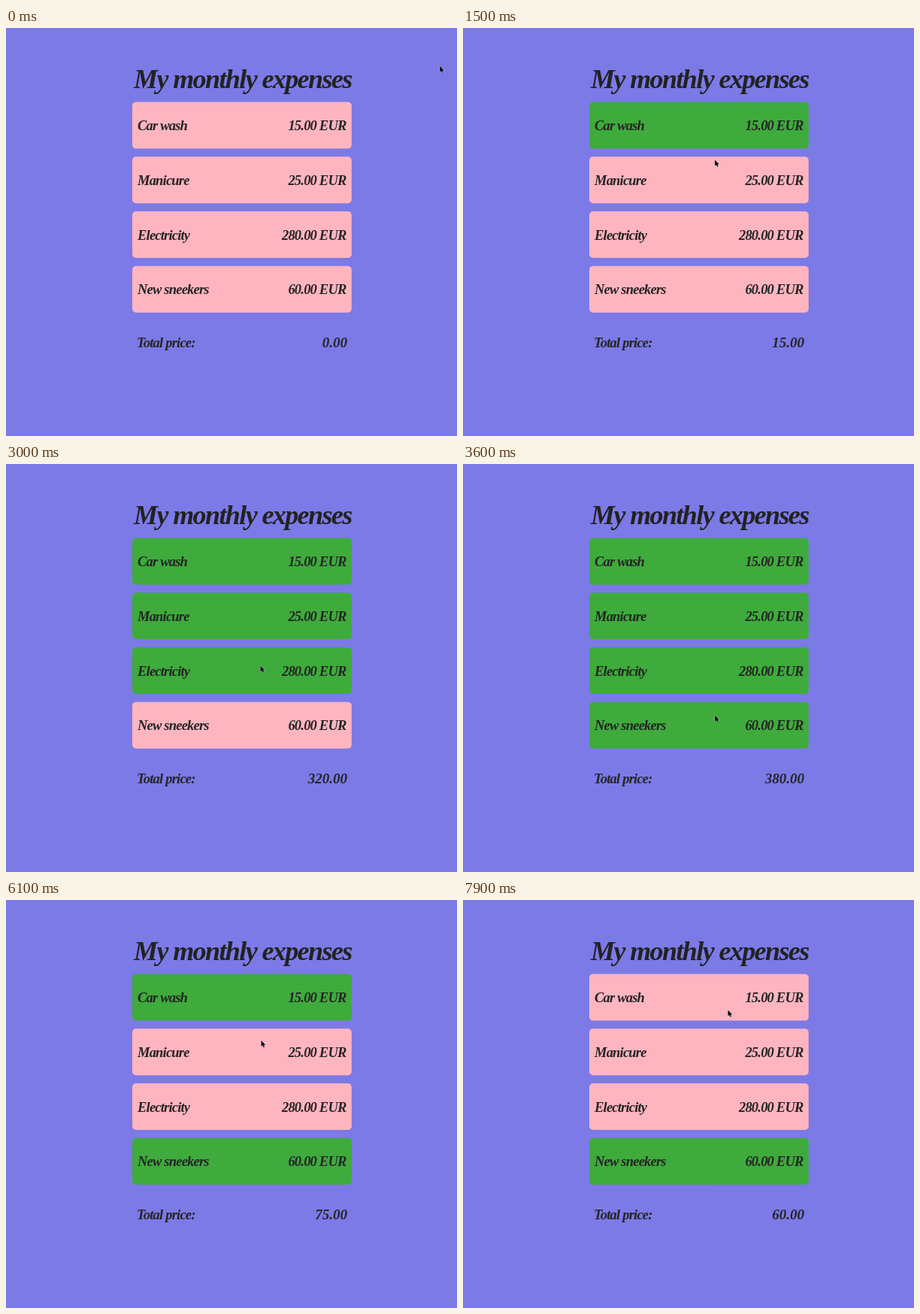
These frames come from a looping animation (600 by 543 pixels, 8000 ms). An HTML page:

```html
<!DOCTYPE html>
<html lang="en">
<head>
<meta charset="utf-8">
<title>My monthly expenses</title>
<style>
  html, body { margin: 0; width: 100%; height: 100%; overflow: hidden; background: #7c7ae6; }
  svg { display: block; width: 100%; height: 100%; }
  text {
    font: italic bold 18.5px "Liberation Serif", "Noto Serif", serif;
    letter-spacing: -0.8px;
    fill: #242424;
  }
  .title { font-size: 36px; letter-spacing: -1.6px; fill: #222; }
  .end { text-anchor: end; }
  #sum { font-size: 19px; letter-spacing: 0; }
</style>
</head>
<body>
<svg id="stage" viewBox="0 0 600 543">
  <rect width="600" height="543" fill="#7c7ae6"/>
  <text class="title" x="170" y="80">My monthly expenses</text>
  <g id="rows"></g>
  <text x="174" y="425">Total price:</text>
  <text id="sum" class="end" x="454" y="425">0.00</text>
  <path id="cursor" d="M0 0V8L1.9 6.4L3.1 9.2L4.6 8.6L3.4 5.9H5.8Z"
        fill="#0a0a0a" stroke="#e8e8f4" stroke-width=".7" paint-order="stroke"/>
</svg>
<script>
const LOOP = 8000, PINK = '#ffb5c0', GREEN = '#3eab3c';

// Each item flips between unpaid and paid at the listed times.
const items = [
  { name: 'Car wash', price: 15, flips: [900, 7300] },
  { name: 'Manicure', price: 25, flips: [1800] },
  { name: 'Electricity', price: 280, flips: [2700] },
  { name: 'New sneekers', price: 60, flips: [3500] }
];
items[1].flips.push(5700);
items[2].flips.push(4600);

// Pointer stops: time, x, y
const stops = [
  [0, 577, 50.5], [500, 346, 131], [600, 346, 131], [1000, 342, 133],
  [1500, 335, 175.5], [1800, 336, 197], [2000, 336, 198],
  [2600, 338, 263], [3000, 338.5, 268.5], [3400, 335.5, 333],
  [3600, 335, 334.5], [4000, 334, 331], [4500, 332, 279],
  [4800, 332, 277], [5600, 338, 195], [6100, 339.5, 187],
  [7200, 351, 148], [7900, 352.5, 146.5], [8000, 352.5, 146.5]
];

const $ = id => document.getElementById(id);
const money = n => n.toFixed(2);

function add(parent, tag, attrs, text = '') {
  const el = document.createElementNS('http://www.w3.org/2000/svg', tag);
  for (const key in attrs) el.setAttribute(key, attrs[key]);
  el.textContent = text;
  return parent.appendChild(el);
}

items.forEach((item, i) => {
  const y = 98.6 + 72.7 * i;
  item.box = add($('rows'), 'rect', { x: 168, y, width: 291.8, height: 62, rx: 5 });
  add($('rows'), 'text', { x: 175, y: y + 37.5 }, item.name);
  add($('rows'), 'text', { x: 452.5, y: y + 37.5, class: 'end' }, money(item.price) + ' EUR');
});

function pointerAt(t) {
  const i = Math.max(1, stops.findIndex(s => s[0] >= t));
  const [t0, x0, y0] = stops[i - 1], [t1, x1, y1] = stops[i];
  const u = (t - t0) / (t1 - t0), k = u * u * (3 - 2 * u);
  return [x0 + (x1 - x0) * k, y0 + (y1 - y0) * k];
}

function draw(t) {
  let sum = 0;
  for (const { price, flips, box } of items) {
    const paid = flips.filter(f => t >= f).length % 2 === 1;
    box.setAttribute('fill', paid ? GREEN : PINK);
    if (paid) sum += price;
  }
  $('sum').textContent = money(sum);
  $('cursor').setAttribute('transform', `translate(${pointerAt(t)})`);
}

function tick() {
  draw(performance.now() % LOOP);
  requestAnimationFrame(tick);
}
tick();
</script>
</body>
</html>
```
